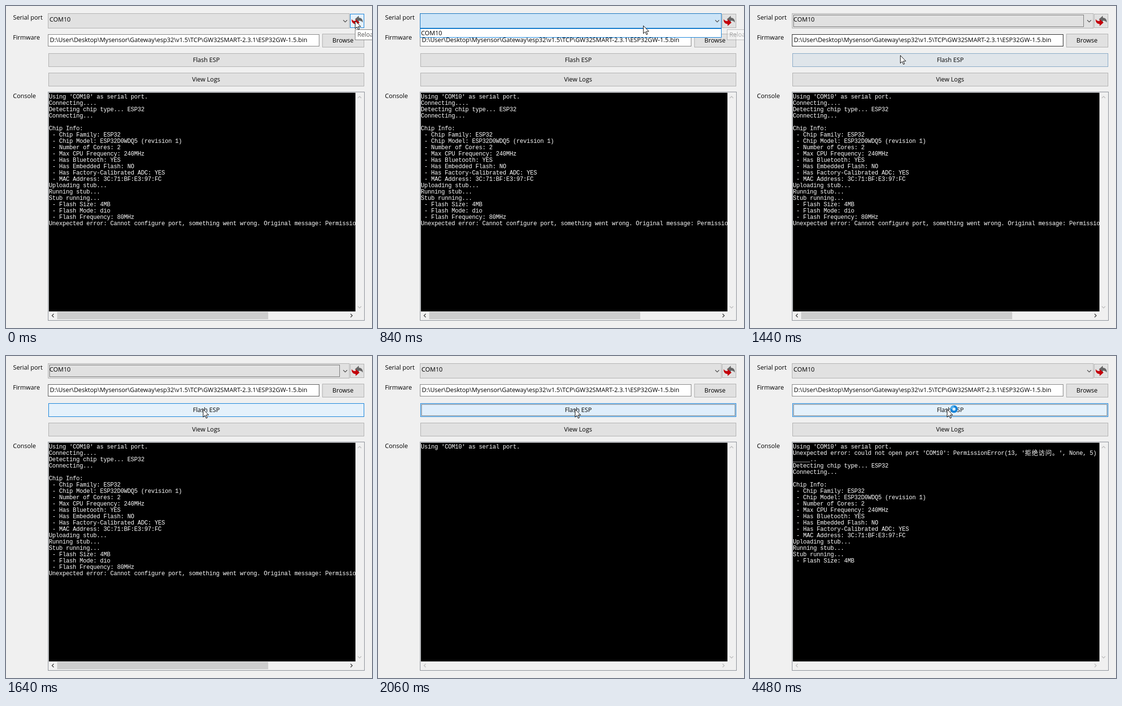
Recreate the animation shown at these times as an HTML page. Size 751 by 661 pixels, loop 8000 ms.

```html
<!DOCTYPE html>
<html lang="en">
<head>
<meta charset="utf-8">
<title>Flasher</title>
<style>
  html, body { margin: 0; width: 100%; height: 100%; overflow: hidden; background: #f0f0f0; }
  svg { display: block; width: 751px; height: 661px; }
  text { font: 12.6px "Open Sans", "Noto Sans", sans-serif; fill: #000; white-space: pre; }
  .mid { text-anchor: middle; }
  .btn { fill: #e1e1e1; stroke: #adadad; }
  .hot { fill: #e5f1fb; stroke: #0078d7; }
  .fading { fill: #dfe5ea; stroke: #7fa3c2; }
  .settling { fill: #e0eefb; stroke: #0078d7; }
  .down { fill: #cce4f7; stroke: #0067b8; }
  .focus { fill: none; stroke: #000; stroke-dasharray: 1 1; }
  .chev { fill: none; stroke: #404040; stroke-width: 1.2; }
  .bar { fill: none; stroke: #bfbfbf; stroke-width: 1.5; }
  .on { stroke: #404040; }
  #log text { font: 12px "Liberation Mono", "DejaVu Sans Mono", monospace; letter-spacing: -.2px; fill: #fff; }
  #log .cjk { font: 13px "Noto Sans CJK SC", "Noto Sans CJK", sans-serif; letter-spacing: 1px; }
</style>
</head>
<body>
<svg viewBox="0 0 751 661">
  <defs>
    <clipPath id="screen"><rect x="88" y="178" width="629" height="449"/></clipPath>
    <path id="arrow" d="M716 27l8-7v4c5 0 9 4 8 10-2-3-4-4-8-4v4z"/>
  </defs>

  <text x="14.5" y="28">Serial port</text>
  <text x="14.2" y="69">Firmware</text>
  <text x="14.2" y="189">Console</text>

  <rect id="combo" x="86.5" y="15.5" width="618" height="30"/>
  <text id="port" x="89.3" y="32">COM10</text>
  <rect id="comboFocus" class="focus" x="89.5" y="18.5" width="595" height="24"/>
  <path class="chev" d="M692 29l4 4 4-4"/>

  <rect id="reload" x="706.5" y="16.5" width="28" height="28"/>
  <use href="#arrow" fill="#666"/>
  <use href="#arrow" fill="#c4000a" transform="rotate(180 720.7 30.5)"/>

  <rect id="edit" x="86.5" y="58.5" width="556" height="24" fill="#fff"/>
  <text x="90" y="74">D:\User\Desktop\Mysensor\Gateway\esp32\v1.5\TCP\GW32SMART-2.3.1\ESP32GW-1.5.bin</text>
  <rect class="btn" x="649.5" y="57.5" width="85" height="27"/>
  <text class="mid" x="691.5" y="75">Browse</text>

  <rect id="flash" x="87.5" y="97.5" width="647" height="27"/>
  <rect id="flashFocus" class="focus" x="89.5" y="99.5" width="643" height="23"/>
  <text class="mid" x="411" y="115">Flash ESP</text>
  <rect class="btn" x="87.5" y="137.5" width="647" height="27"/>
  <text class="mid" x="410.5" y="155">View Logs</text>

  <rect x="86.5" y="176.5" width="649" height="469" fill="#f0f0f0" stroke="#828790"/>
  <rect x="88" y="178" width="629" height="449"/>
  <g id="log" clip-path="url(#screen)"></g>
  <path class="bar" d="M722 189l3.5-3.5 3.5 3.5M722 616.500l3.500 3.500 3.500-3.500"/>
  <rect id="thumb" x="105" y="628" width="433" height="15" fill="#cdcdcd"/>
  <path id="sideArrows" d="M98 632l-3.500 3.500 3.500 3.500M707 632l3.500 3.500-3.500 3.500"/>

  <g id="list">
    <rect x="86.500" y="46.500" width="618" height="18" fill="#fff" stroke="#0078d7"/>
    <rect id="pick" x="87" y="47" width="617" height="17" fill="#0078d7"/>
    <text id="item" x="88.300" y="60">COM10</text>
  </g>
  <g id="tip">
    <rect x="716.500" y="48.500" width="50" height="21" fill="#fff" stroke="#767676"/>
    <text x="721" y="63" style="fill:#575757">Reload</text>
  </g>

  <g id="cursor">
    <circle id="click" r="12.500" fill="#f8e800" opacity=".7"/>
    <path d="M.5.5V16.500l3.700-3.500 2.600 5.800 2.300-1-2.500-5.700h5.200z" fill="#fff" stroke="#000"/>
    <g id="busy" transform="translate(14.500 0)">
      <circle r="5.500" fill="#d9eefb" stroke="#1683d8" stroke-width="4.500"/>
      <path d="M-5.500 0A5.500 5.500 0 0 1 0-5.500" fill="none" stroke="#55b4ef" stroke-width="3"/>
    </g>
  </g>
</svg>

<script>
const LOOP = 8000;
const $ = id => document.getElementById(id);

const using = "Using 'COM10' as serial port.";
const chip = `Detecting chip type... ESP32
Connecting...

Chip Info:
 - Chip Family: ESP32
 - Chip Model: ESP32D0WDQ5 (revision 1)
 - Number of Cores: 2
 - Max CPU Frequency: 240MHz
 - Has Bluetooth: YES
 - Has Embedded Flash: NO
 - Has Factory-Calibrated ADC: YES
 - MAC Address: 3C:71:BF:E3:97:FC
Uploading stub...
Running stub...
Stub running...
 - Flash Size: 4MB
 - Flash Mode: dio
 - Flash Frequency: 80MHz`.split('\n');
const firstRun = [using, 'Connecting....', ...chip,
  'Unexpected error: Cannot configure port, something went wrong. Original message: PermissionError'];
const secondRun = [using,
  "Unexpected error: could not open port 'COM10': PermissionError(13, '拒绝访问。', None, 5)",
  '_____..', ...chip];

// Each step changes only the listed values and holds until the next one.
const steps = [
  { at: 0, x: 716, y: 30, combo: 'btn', reload: 'hot', flash: 'btn', edit: '#7a7a7a',
    port: 1, tip: 1, lines: firstRun, count: firstRun.length, thumb: 1 },
  { at: 420, port: 0, click: 1 },
  { at: 620, x: 560, y: 38, click: 0, combo: 'hot', reload: 'btn', tip: .8 },
  { at: 840, x: 544, y: 40, combo: 'down', list: 1, tip: .45 },
  { at: 1040, x: 481, y: 57, pick: 1, tip: 0 },
  { at: 1240, x: 470, y: 58, list: 0, pick: 0, port: 1, comboFocus: 1 },
  { at: 1440, x: 308, y: 101, combo: 'btn', flash: 'fading', edit: '#171717' },
  { at: 1640, x: 404, y: 109, flash: 'hot', edit: '#4a4a4a' },
  { at: 1840, flash: 'down', flashFocus: 1, comboFocus: 0, click: 1 },
  { at: 2060, flash: 'settling', click: 0, edit: '#7a7a7a', lines: secondRun, count: 1, thumb: 0 },
  { at: 3870, flash: 'hot', busy: 1, count: 2 },
  { at: 4080, count: 4 },
  { at: 4260, count: 16 },
  { at: 4480, count: 19 }
];

function logLine(text, i) {
  const body = text.replace(/[\u3000-\u9fff]+/, s => `<tspan class="cjk">${s}</tspan>`);
  return `<text x="88" y="${190 + 13 * i}">${body}</text>`;
}

function show(s) {
  for (const id of ['port', 'comboFocus', 'flashFocus', 'list', 'pick', 'thumb', 'click', 'busy'])
    $(id).style.display = s[id] ? '' : 'none';
  for (const id of ['combo', 'reload', 'flash']) $(id).setAttribute('class', s[id]);
  $('edit').style.stroke = s.edit;
  $('tip').style.opacity = s.tip;
  $('item').style.fill = s.pick ? '#fff' : '#000';
  $('sideArrows').setAttribute('class', s.thumb ? 'bar on' : 'bar');
  $('cursor').setAttribute('transform', `translate(${s.x} ${s.y})`);
  $('log').innerHTML = s.lines.slice(0, s.count).map(logLine).join('');
}

const start = performance.now();
let shown = 0;
function tick() {
  const t = (performance.now() - start) % LOOP;
  const past = steps.filter(s => s.at <= t);
  if (past.length !== shown) {
    shown = past.length;
    show(Object.assign({}, ...past));
  }
  requestAnimationFrame(tick);
}
tick();
</script>
</body>
</html>
```
